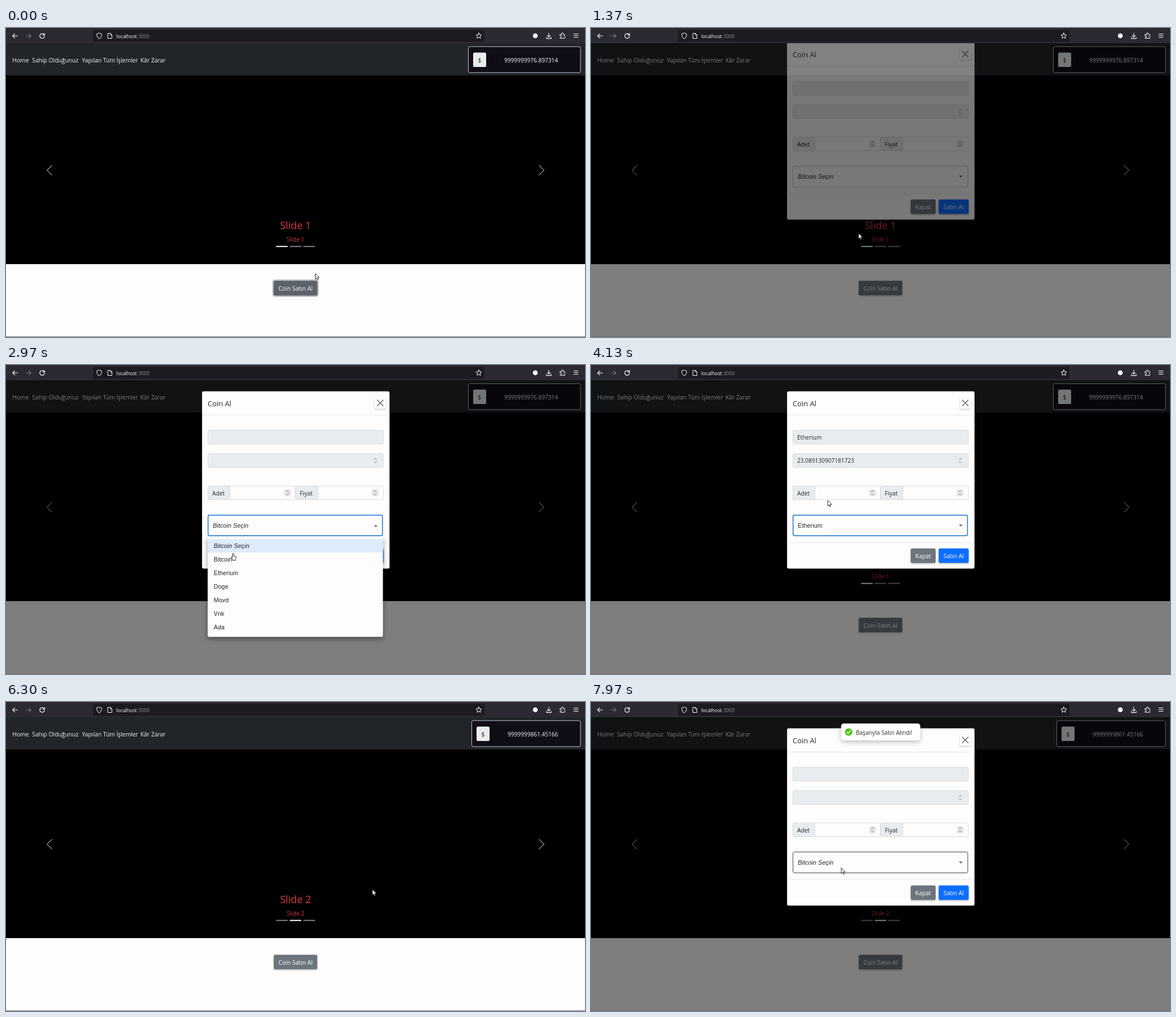
These frames come from a looping animation (1025 px wide and 547 px high, 8 s). An HTML page with a canvas:

```html
<!DOCTYPE html>
<html lang="tr">
<head>
<meta charset="utf-8">
<title>Coin</title>
<style>
  html, body { margin: 0; width: 100%; height: 100%; overflow: hidden; background: #000; }
  canvas { display: block; }
</style>
</head>
<body>
<canvas id="stage" width="1025" height="547"></canvas>
<script>
const LOOP = 8000;
const UI = '"Open Sans", "Noto Sans", sans-serif';
const FORM = '"Liberation Sans", Arial, sans-serif';
const screen2d = document.getElementById('stage').getContext('2d');
const layer = document.createElement('canvas');
layer.width = 1025;
layer.height = 547;
const layer2d = layer.getContext('2d');
let g = screen2d;

const COINS = ['Bitcoin Seçin', 'Bitcoin', 'Etherium', 'Doge', 'Movd', 'Vnk', 'Ada'];
const PRICE = 23.089130907181723;

// Pointer stops: time, x, y, hand shape until the next stop
const PATH = [
  [0, 547.5, 435, 0], [30, 547.5, 435, 0], [130, 534, 451, 1], [200, 525, 462, 1], [800, 525, 462, 1],
  [1130, 518, 458, 1], [1200, 506, 432, 0], [1370, 474, 364, 0], [1600, 428, 297, 0],
  [1630, 428, 296, 0], [2070, 424, 225, 0], [2300, 424, 225, 0], [2440, 419, 264, 1],
  [2530, 415, 284, 1], [2680, 415, 284, 1], [2970, 402, 333, 1], [3200, 400, 366, 1],
  [3620, 400, 366, 1], [3760, 405, 335, 0], [4130, 419, 240, 0], [4400, 419, 240, 0],
  [4620, 430, 226, 0], [5230, 430, 226, 0], [5900, 640, 327, 1], [6030, 649, 332, 1],
  [6150, 649, 332, 0], [6300, 649, 332, 0], [6760, 540, 448, 1], [6800, 535, 452, 1],
  [6930, 535, 452, 1], [7080, 512, 458, 1], [7270, 470, 262, 1], [7400, 459, 274, 0],
  [7730, 441, 300, 0], [7770, 441, 300, 0], [7970, 443, 294, 0], [8000, 443, 294, 0]
];

const clamp = v => Math.max(0, Math.min(1, v));
const ramp = (t, start, length) => clamp((t - start) / length);
const smooth = v => v * v * (3 - 2 * v);
const easeOut = v => Math.sin(v * Math.PI / 2);
const within = (t, a, b) => t >= a && t < b;

function rect(x, y, w, h, fill) {
  g.fillStyle = fill;
  g.fillRect(x, y, w, h);
}

function box(x, y, w, h, radius, fill, stroke, width = 1) {
  g.beginPath();
  g.roundRect(x, y, w, h, radius);
  if (fill) { g.fillStyle = fill; g.fill(); }
  if (stroke) { g.strokeStyle = stroke; g.lineWidth = width; g.stroke(); }
}

function shadowed(color, blur, dy, draw) {
  g.save();
  g.shadowColor = color;
  g.shadowBlur = blur;
  g.shadowOffsetY = dy;
  draw();
  g.restore();
}

function text(str, x, y, size, color, align = 'left', family = UI, style = '') {
  g.font = `${style} ${size}px ${family}`;
  g.textAlign = align;
  g.fillStyle = color;
  g.fillText(str, x, y);
}

function formText(str, x, y, italic) {
  g.letterSpacing = '0.1px';
  text(str, x, y, 10.67, '#212121', 'left', FORM, italic ? 'italic' : '');
  g.letterSpacing = '0px';
}

function line(color, width, ...points) {
  g.beginPath();
  for (let i = 0; i < points.length; i += 2) g.lineTo(points[i], points[i + 1]);
  g.strokeStyle = color;
  g.lineWidth = width;
  g.stroke();
}

function shape(path, x, y, stroke, width, fill) {
  g.save();
  g.translate(x, y);
  g.lineJoin = g.lineCap = 'round';
  const p = new Path2D(path);
  if (fill) { g.fillStyle = fill; g.fill(p); }
  if (stroke) { g.strokeStyle = stroke; g.lineWidth = width; g.stroke(p); }
  g.restore();
}

function button(label, x, y, w, fill) {
  shadowed('rgba(0,0,0,.35)', 3, 1.3, () => box(x, y, w, 25.5, 2.6, fill));
  text(label, x + w / 2, y + 17, 10.4, '#fff', 'center');
}

function pointer(t) {
  const i = Math.max(0, PATH.findIndex(p => p[0] > t) - 1);
  const a = PATH[i], b = PATH[i + 1];
  const k = ramp(t, a[0], b[0] - a[0]);
  return { x: a[1] + (b[1] - a[1]) * k, y: a[2] + (b[2] - a[2]) * k, hand: a[3] };
}

function over(p, x, y, w, h) {
  return p.x > x && p.x < x + w && p.y > y && p.y < y + h;
}

function browserBar() {
  const ink = '#fbfbfe';
  rect(0, 0, 1025, 27, '#2b2a33');
  box(154, 3, 693, 21.5, 2.6, '#1c1b22');
  const back = 'M4.5 0H-4M-.5-3.7L-4.2 0L-.5 3.7';
  shape(back, 16, 14, ink, 1.2);
  g.save();
  g.translate(40, 14);
  g.scale(-1, 1);
  shape(back, 0, 0, '#77767e', 1.2);
  g.restore();
  shape('M3.6-2.2A4.2 4.2 0 1 0 4.2 .6M4.2-4.5V-1.4H1', 64, 14, ink, 1.2);
  shape('M0-5L4.3-3.4C4.3 1 3 3.6 0 5.2C-3 3.6-4.3 1-4.3-3.4Z', 165, 14, ink, 1);
  shape('M-3.4-4.5H.8L3.5-1.8V4.5H-3.4ZM.8-4.5V-1.8H3.5', 184, 14, ink, 1);
  text('localhost', 195, 17.5, 8.75, ink);
  text(':3000', 231.8, 17.5, 8.75, '#91909a');
  let star = '';
  for (let i = 0; i < 10; i++) {
    const r = i % 2 ? 2.4 : 5.3, a = i * Math.PI / 5;
    star += `${i ? 'L' : 'M'}${r * Math.sin(a)} ${-r * Math.cos(a)}`;
  }
  shape(star + 'Z', 837, 14, ink, 1);
  box(932.7, 9.5, 8.6, 8.6, 4.3, ink);
  shape('M0-5V2M-2.8-.6L0 2.2L2.8-.6M-4.2 2.4V4.6H4.2V2.4', 961, 14, ink, 1.1);
  shape('M-4-2H-1.4V-3.5A1.4 1.4 0 0 1 1.4-3.5V-2H4V4.8H-4V2.8H-2.5A1.4 1.4 0 0 0-2.5 0H-4Z', 985, 13.5, ink, 1);
  shape('M-3.8-3H3.8M-3.8 0H3.8M-3.8 3H3.8', 1009, 13.5, ink, 1.1);
}

function navbar(t) {
  rect(0, 27, 1025, 57.5, '#212529');
  [['Home', 11.3], ['Sahip Olduğunuz', 46.3], ['Yapılan Tüm İşlemler', 134.5], ['Kâr Zarar', 238]]
    .forEach(([label, x]) => text(label, x, 60.5, 10.3, '#f4f5f6'));
  const paid = t >= 6150;
  const x = paid ? 824.5 : 818.5;
  box(x, 33, 1017 - x, 46, 2.6, '#110d17', '#c3c6d4');
  box(x + 8.5, 43.5, 23, 25.5, 2.6, '#e9ecef');
  text('$', x + 20, 60.5, 10.2, '#212529', 'center');
  text(paid ? '9999999861.45166' : '9999999976.897314', x + 63.5, 60.5, 10.1, '#f8f8fa');
}

function carousel(t) {
  rect(0, 84, 1025, 334, '#000');
  const k = smooth(ramp(t, 5300, 600));
  [1, 2].forEach(n => {
    const x = 512.5 + (n - 1 - k) * 1025;
    text('Slide ' + n, x, 356, 17.9, '#dc3545', 'center');
    text('Slide ' + n, x, 377.5, 10.25, '#dc3545', 'center');
  });
  line('#8c8c8c', 1.3, 81.5, 243, 72.7, 251.7, 81.5, 260.5);
  line('#8c8c8c', 1.3, 943.5, 243, 952.3, 251.7, 943.5, 260.5);
  const next = ramp(t, 5300, 600);
  [1 - next, next, 0].forEach((on, i) =>
    rect(478.2 + i * 24.1, 385.7, 20.5, 2, `rgba(255,255,255,${0.5 + on / 2})`));
}

function page(t, p) {
  rect(0, 418, 1025, 129, '#fdfdfd');
  navbar(t);
  carousel(t);
  const focused = t < 1150;
  const hover = over(p, 474, 447, 77, 26);
  if (focused) box(471.5, 445, 82, 30.5, 4.5, '#c0c4c8');
  button('Coin Satın Al', 474, 447.5, 77, focused || hover ? '#5c636a' : '#6c757d');
}

function spinner(x, y, fill) {
  if (fill) box(x - 6, y - 6, 12, 12.5, 1.5, fill);
  line('#6f6f78', 0.9, x - 2.4, y - 1.6, x, y - 3.8, x + 2.4, y - 1.6);
  line('#6f6f78', 0.9, x - 2.4, y + 1.9, x, y + 4.1, x + 2.4, y + 1.9);
}

function field(x, y, w, value, fill) {
  box(x + .5, y + .5, w - 1, 24.5, 2.6, fill, '#ced4da', 0.8);
  g.save();
  g.beginPath();
  g.rect(x + 5, y, w - 28, 26);
  g.clip();
  text(value, x + 8, y + 17, 10.1, '#212529');
  g.restore();
}

function label(str, x, w) {
  box(x + .5, 214, w, 24.5, [2.6, 0, 0, 2.6], '#e9ecef', '#ced4da', 0.8);
  text(str, x + 8, 230.5, 10.3, '#212529');
}

function modal(t, p) {
  const chosen = within(t, 3560, 6400);
  const typed = within(t, 4950, 6400);
  const typing = within(t, 4640, 6080);
  const selectFocus = within(t, 2680, 4640);
  box(347, 46.5, 332, 314, 3, '#fdfdfd', 'rgba(0,0,0,.2)', 0.8);
  text('Coin Al', 357, 72.5, 12.9, '#212529');
  shadowed('rgba(0,0,0,.2)', 3, 1.5, () => box(652.5, 57, 20, 20.5, 2.5, '#fdfdfd'));
  line('#6c6c6c', 1.6, 657, 61.7, 668, 72.7);
  line('#6c6c6c', 1.6, 668, 61.7, 657, 72.7);
  rect(347.5, 88, 331, 0.8, '#dee2e6');
  rect(347.5, 313.7, 331, 0.8, '#dee2e6');

  field(357, 115, 311.5, chosen ? 'Etherium' : '', '#e9ecef');
  field(357, 156.3, 311.5, chosen ? String(PRICE) : '', '#e9ecef');
  spinner(654, 169);
  label('Adet', 357, 39);
  field(395.7, 213.5, 117, typed ? '5' : '', '#fdfdfd');
  if (typing) {
    box(394.7, 212.5, 119, 27.5, 2.6, null, 'rgba(13,110,253,.25)', 2.6);
    box(396.2, 214, 116, 24.5, 0, null, '#86b7fe', 0.8);
    if (Math.floor((t - 4640) / 500) % 2 === 0) rect(typed ? 410.2 : 404, 221, 0.8, 11, '#212529');
  }
  spinner(498.3, 226, '#e6e6ec');
  label('Fiyat', 512.3, 39);
  field(551.3, 213.5, 117.2, typed ? String(PRICE * 5) : '', '#fdfdfd');
  spinner(653.5, 226, '#e6e6ec');

  const hover = over(p, 357, 265, 310, 38) && !within(t, 2680, 3760);
  if (selectFocus) box(357.7, 265.7, 308.8, 36.6, 2.7, null, '#1976d2', 1.5);
  else box(357.5, 265.5, 309.5, 37, 2.7, null, hover ? '#33333b' : 'rgba(0,0,0,.25)', 0.9);
  formText(chosen ? COINS[2] : COINS[0], 366.3, 288, !chosen);
  const up = within(t, 2680, 3560);
  shape(up ? 'M-3.3 1.7L0-1.6L3.3 1.7Z' : 'M-3.3-1.7L0 1.6L3.3-1.7Z', 654.6, 284.3, null, 0, '#666');

  button('Kapat', 566, 324.7, 44, '#6c757d');
  const buy = over(p, 615.5, 325, 53, 26) && within(t, 5500, 6300);
  button('Satın Al', 615.5, 324.7, 53, buy ? '#0b5ed7' : '#0d6efd');
}

function menu(t, p) {
  const grow = smooth(ramp(t, 2690, 250));
  const leave = smooth(ramp(t, 3560, 200));
  const alpha = grow * (1 - leave);
  if (!alpha) return;
  const s = leave ? 1 - .25 * leave : .75 + .25 * grow;
  g.save();
  g.globalAlpha = alpha;
  g.translate(512.2, 303);
  g.scale(s, s * s);
  g.translate(-512.2, -303);
  shadowed('rgba(0,0,0,.4)', 9, 4, () => box(357, 303, 310.3, 178.3, 2.7, '#fdfdfd'));
  COINS.forEach((coin, i) => {
    const y = 308 + i * 24;
    if (!i) rect(357, y, 310.3, 24, '#deebfa');
    else if (t > 3050 && over(p, 357, y, 310, 24)) rect(357, y, 310.3, 24, '#f4f4f4');
    formText(coin, 367.8, y + 15.8, !i);
  });
  g.restore();
}

function toast(t) {
  const k = easeOut(ramp(t, 6400, 300));
  if (!k) return;
  g.save();
  g.beginPath();
  g.rect(0, 27, 1025, 520);
  g.clip();
  g.globalAlpha = k;
  g.translate(0, -36 * (1 - k));
  shadowed('rgba(0,0,0,.25)', 9, 3, () => box(442.7, 38, 140.3, 30, 5, '#fff'));
  box(449.5, 46.5, 13.2, 13.2, 6.6, '#52c41a');
  line('#fff', 1.4, 453, 53.2, 455.4, 55.7, 459.3, 50.6);
  text('Başarıyla Satın Alındı!', 469, 57.5, 10.06, '#2b2b2b');
  g.restore();
}

function drawPointer({ x, y, hand }) {
  const arrow = 'M0 0V9.6L2.2 7.5L3.8 11L5.3 10.3L3.8 6.9H6.8Z';
  const glove = 'M-1 .8Q0-.5 1 .8V4.6L4.4 5.4Q5.6 5.8 5.4 7.2L4.4 10.6V12.7H-.6V11.2L-3.6 7.6Q-3.6 6-2 6.6L-1 7.6Z';
  shape(hand ? glove : arrow, x, y, '#1a1a1a', 0.9, '#fff');
}

function drawModalLayer(t, p, start, end) {
  const close = ramp(t, end, 150);
  const shift = -33.3 * (1 - easeOut(ramp(t, start, 300))) - 33.3 * easeOut(ramp(t, end, 300));
  const dim = .5 * ramp(t, start - 150, 150) * (1 - close);
  rect(0, 27, 1025, 520, `rgba(0,0,0,${dim})`);
  const alpha = ramp(t, start, 150) * (1 - close);
  if (!alpha) return;
  g = layer2d;
  g.clearRect(0, 0, 1025, 547);
  modal(t, p);
  g = screen2d;
  g.save();
  g.beginPath();
  g.rect(0, 27, 1025, 520);
  g.clip();
  g.globalAlpha = alpha;
  g.drawImage(layer, 0, shift);
  g.restore();
}

function draw(t) {
  const p = pointer(t);
  page(t, p);
  if (t < 6900) drawModalLayer(t, p, 1300, 6080);
  else drawModalLayer(t, p, 7375, LOOP);
  menu(t, p);
  toast(t);
  browserBar();
  rect(0, 546, 1025, 1, '#72727e');
  drawPointer(p);
}

function tick() {
  draw(performance.now() % LOOP);
  requestAnimationFrame(tick);
}
tick();
</script>
</body>
</html>
```
